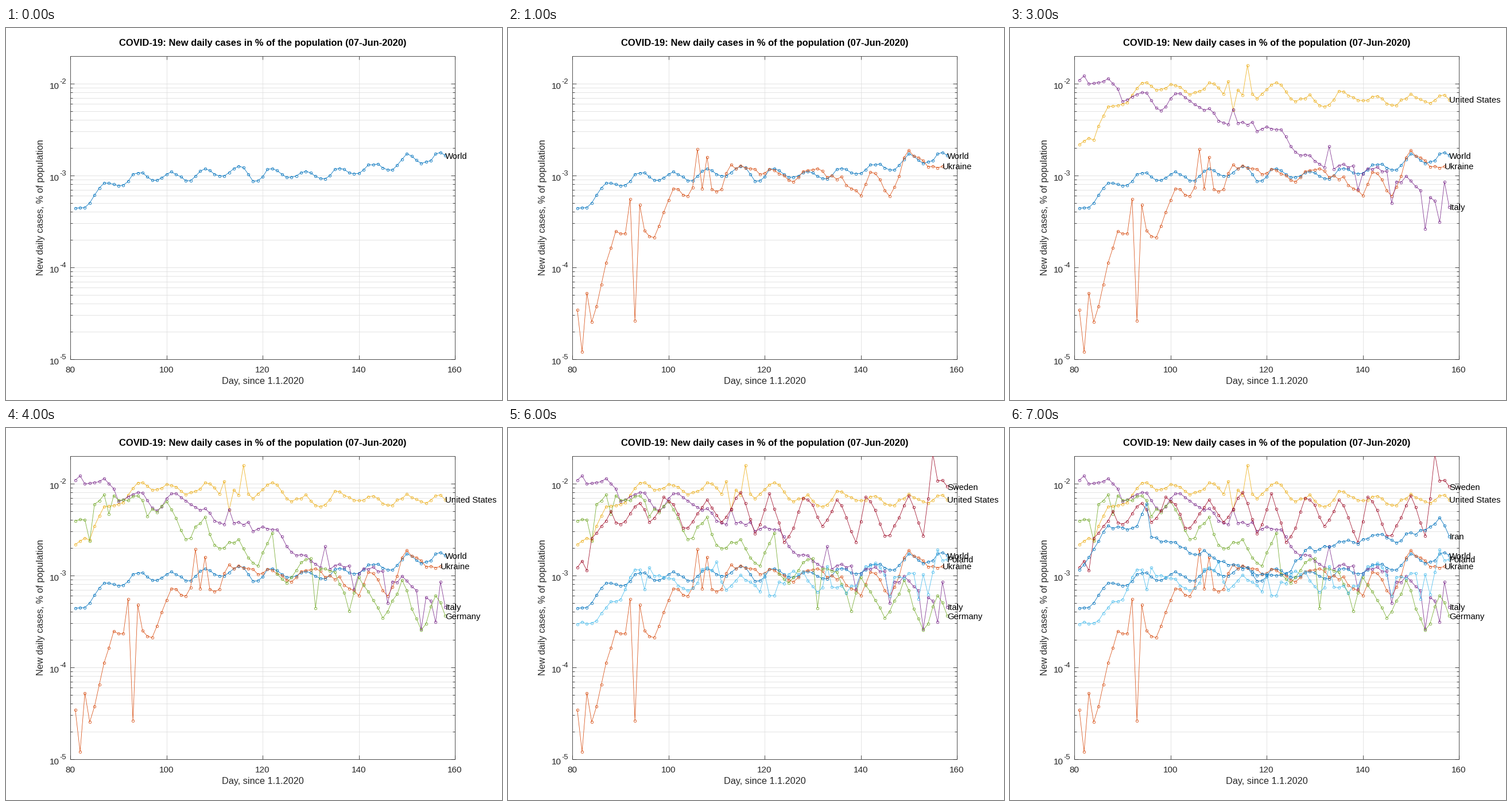
A matplotlib script for the animation above (8 s loop, 864 px wide and 648 px high).

```python
import numpy as np
import matplotlib.pyplot as plt
from matplotlib.animation import FuncAnimation
from matplotlib.patches import Rectangle

W, H, DPI = 864, 648, 100
PX = 72 / DPI                      # one pixel in points
LEFT, RIGHT = 0.13 * W, 0.905 * W
TOP, BOTTOM = 0.075 * H, 0.89 * H
DECADE = (BOTTOM - TOP) / np.log10(2000)
FIRST_DAY = 81
THIN = 0.8 * PX
INK = "#262626"
GRID = "#dedede"

fig = plt.figure(figsize=(W / DPI, H / DPI), dpi=DPI, facecolor="white")
ax = fig.add_axes([0, 0, 1, 1])
ax.set_xlim(0, W)
ax.set_ylim(H, 0)
ax.axis("off")


def day_x(day):
    return LEFT + (day - 80) * (RIGHT - LEFT) / 80


def level_y(value):
    return BOTTOM - DECADE * (np.log10(value) + 5)


def stroke(xs, ys, color, z):
    ax.plot(xs, ys, color=color, lw=THIN, zorder=z, solid_capstyle="butt")


def write(x, y, text, size, color=INK, **kw):
    return ax.text(x, y, text, fontsize=size * PX, color=color,
                   family="Liberation Sans", va="baseline", **kw)


def draw_axes():
    for day in range(80, 161, 20):
        x = day_x(day)
        if 80 < day < 160:
            stroke([x, x], [TOP, BOTTOM], GRID, 1)
        stroke([x, x], [TOP, TOP + 6.5], INK, 1.5)
        stroke([x, x], [BOTTOM - 6.5, BOTTOM], INK, 1.5)
        write(x, 600.3, str(day), 15.2, ha="center")

    for power in range(-5, -1):
        for k in range(1, 10):
            value = k * 10.0 ** power
            if value > 0.0199:
                break
            y = level_y(value)
            size = 6.5 if k == 1 else 3.5
            stroke([LEFT, RIGHT], [y, y], GRID, 1)
            stroke([LEFT, LEFT + size], [y, y], INK, 1.5)
            stroke([RIGHT - size, RIGHT], [y, y], INK, 1.5)
        y = level_y(10.0 ** power)
        write(76.3, y + 9, "10", 15.2)
        write(93.3, y, str(power), 13)

    stroke([LEFT, RIGHT, RIGHT, LEFT, LEFT],
           [TOP, TOP, BOTTOM, BOTTOM, TOP], INK, 1.6)
    write(447, 30.5, "COVID-19: New daily cases in % of the population (07-Jun-2020)",
          16.55, "black", weight="bold", ha="center")
    write(447.3, 620.4, "Day, since 1.1.2020", 16.3, ha="center")
    write(65.2, 312.3, "New daily cases, % of population", 16.15, rotation=90,
          rotation_mode="anchor", ha="center")


def daily_heights(keys, wave, noise, spikes, seed):
    """Trend through the keys, a weekly rhythm between them, and outliers."""
    days = np.arange(FIRST_DAY, max(keys) + 1)
    rng = np.random.default_rng(seed)
    bumps = -wave * np.cos(2 * np.pi * (days - 3) / 7)
    bumps += noise * rng.standard_normal(len(days))
    key_days = np.array(list(keys))
    trend = np.array(list(keys.values())) - bumps[key_days - FIRST_DAY]
    heights = np.interp(days, key_days, trend) + bumps
    for day, offset in spikes.items():
        heights[day - FIRST_DAY] += offset
    return days, heights


curves = []


def add_series(name, color, keys, wave, noise, spikes={}):
    order = len(curves)
    days, y = daily_heights(keys, wave, noise, spikes, seed=order)
    x = day_x(days)
    line, = ax.plot(x, y, "-o", color=color, lw=THIN, ms=4.4 * PX,
                    mfc="none", mew=THIN, zorder=2 + order)
    line.set_clip_path(Rectangle((LEFT, TOP), RIGHT - LEFT, BOTTOM - TOP,
                                 transform=ax.transData))
    tag = write(x[-1], y[-1] + 5.5, name, 14.85, "black", zorder=2.5 + order)
    curves.append((line, tag))


draw_axes()

# Keys give the height in pixels at a few days; spikes are offsets from the trend.
add_series("World", "#0072bd",
           {81: 314, 87: 270, 95: 252, 104: 266, 116: 243, 118: 267,
            122: 245, 132: 262, 146: 247, 151: 223, 158: 222},
           wave=8, noise=1.5)
add_series("Ukraine", "#d95319",
           {81: 491, 84: 512, 89: 354, 97: 365, 101: 280, 110: 285, 113: 238,
            126: 268, 131: 245, 140: 292, 142: 251, 146: 293, 150: 213,
            157: 241},
           wave=5, noise=4,
           spikes={82: 60, 83: -50, 92: -60, 93: 160, 94: -43, 106: -66,
                   108: -52})
add_series("United States", "#edb120",
           {81: 203, 87: 137, 95: 95, 104: 116, 109: 97, 118: 123, 122: 95,
            125: 123, 132: 137, 135: 110, 147: 135, 150: 115, 158: 125},
           wave=7, noise=2,
           spikes={84: 18, 112: -22, 113: 30, 115: 12, 116: -44})
add_series("Italy", "#7e2f8e",
           {81: 91, 88: 97, 91: 125, 95: 113, 98: 144, 102: 114, 111: 165,
            118: 180, 123: 177, 126: 216, 132: 243, 144: 250, 149: 258,
            158: 312},
           wave=5, noise=3,
           spikes={113: -28, 133: -42, 139: 28, 146: 46, 153: 52, 156: 40,
                   157: -41})
add_series("Germany", "#77ac30",
           {81: 162, 87: 116, 94: 118, 96: 154, 100: 128, 104: 194, 108: 155,
            110: 204, 115: 194, 118: 235, 125: 270, 129: 229, 135: 251,
            138: 319, 140: 260, 145: 331, 149: 265, 153: 352, 156: 292,
            158: 327},
           wave=4, noise=3,
           spikes={84: 47, 88: 30, 120: -27, 121: -48, 122: -70, 131: 78})
add_series("Poland", "#4dbeee",
           {81: 342, 87: 313, 94: 247, 104: 283, 108: 243, 112: 282, 115: 256,
            122: 292, 126: 249, 130: 276, 137: 288, 141: 241, 149: 262,
            158: 229},
           wave=4, noise=5,
           spikes={95: 36, 110: -30, 120: -26, 133: -48, 146: 40, 152: 42,
                   154: 42, 156: -22})
add_series("Sweden", "#a2142f",
           {81: 243, 84: 192, 94: 131, 96: 164, 99: 120, 103: 174, 108: 125,
            111: 164, 115: 112, 118: 184, 121: 114, 124: 199, 128: 122,
            132: 171, 135: 125, 139: 199, 141: 120, 145: 188, 150: 118,
            153: 188, 156: 92, 158: 102},
           wave=10, noise=2,
           spikes={83: 40, 88: -18, 154: -38, 155: -80})
add_series("Iran", "#0072bd",
           {81: 247, 87: 170, 93: 171, 99: 197, 107: 213, 114: 239, 123: 256,
            128: 213, 135: 198, 143: 186, 147: 200, 152: 178, 156: 156,
            158: 188.5},
           wave=3, noise=3, spikes={94: -22, 95: -48})


def update(step):
    for i, pair in enumerate(curves):
        for artist in pair:
            artist.set_visible(i <= step)
    return [artist for pair in curves for artist in pair]


anim = FuncAnimation(fig, update, frames=len(curves), interval=1000,
                     repeat=True, repeat_delay=0, blit=False)
plt.show()
```
